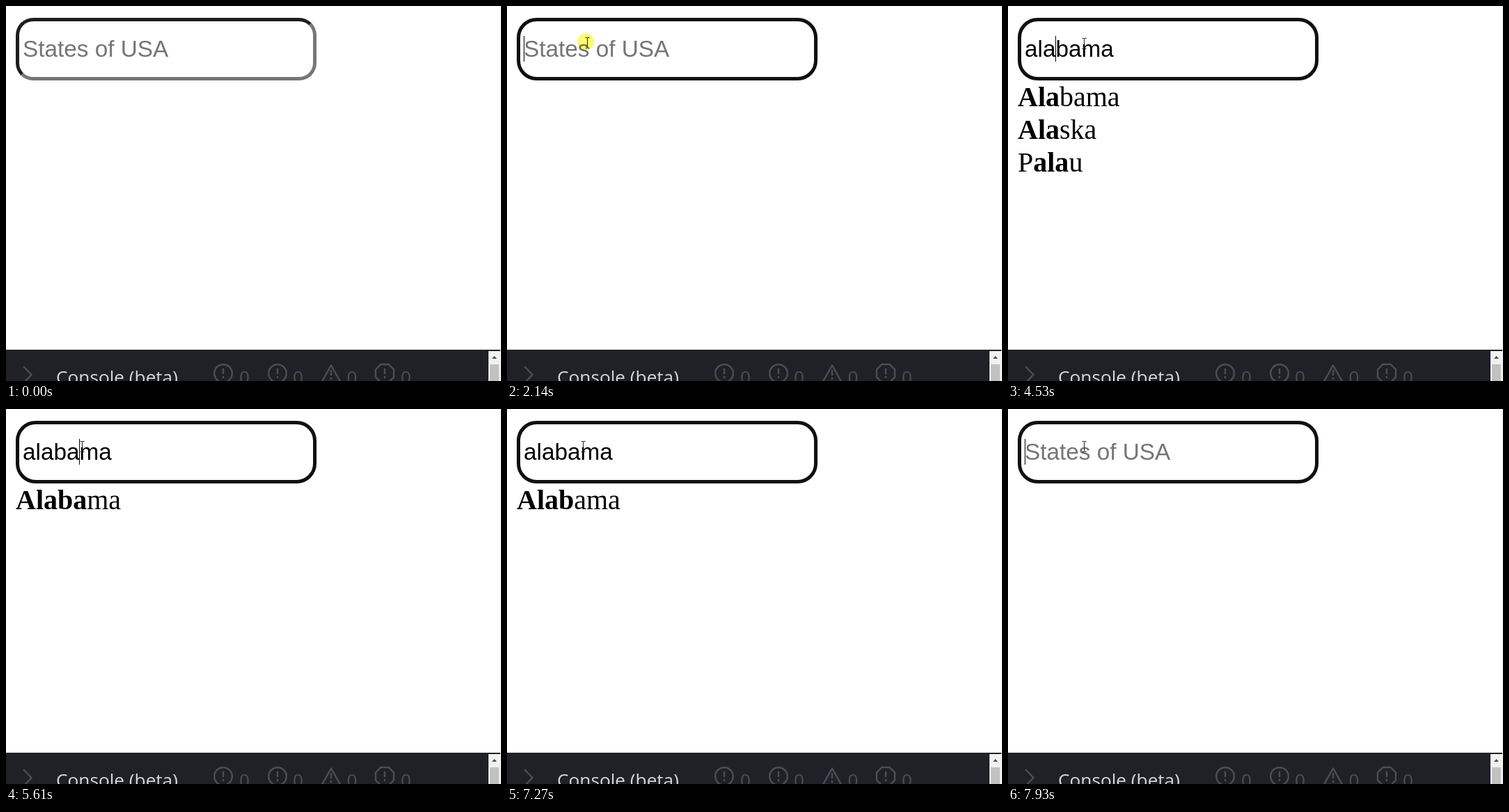
Write an HTML page that moves like this. It is 711 px wide and 539 px high and loops after 8 s.

```html
<!DOCTYPE html>
<html lang="en">
<head>
<meta charset="utf-8">
<title>Autocomplete field</title>
<style>
  html, body { margin: 0; width: 100%; height: 100%; overflow: hidden; background: #fff; }
  svg { position: absolute; left: 0; top: 0; }
  #field {
    position: absolute; left: 14px; top: 17px; width: 432px; height: 90px;
    box-sizing: border-box; border: 5px solid; border-radius: 25px;
    border-color: #1d1d1d #767676 #767676 #1d1d1d;
  }
  #value { font: 33.333px "Liberation Sans", Arial, sans-serif; }
  #results { font: 40px "Liberation Serif", "Times New Roman", serif; }
  .bold { font-weight: bold; }
  .console { font: 26.2px "Open Sans", "Noto Sans", sans-serif; }
  .icons { fill: none; stroke: #4b4e53; stroke-width: 2.4; }
  .icons text { fill: #4b4e53; stroke: none; }
  #glow { mix-blend-mode: multiply; }
</style>
</head>
<body>
<div id="field"></div>
<svg width="711" height="539" viewBox="0 0 711 539">
  <rect id="ring" x="16.5" y="19.5" width="427" height="85" rx="26" fill="none" stroke="#101010" stroke-width="5"/>
  <text id="value" x="24" y="73"></text>
  <rect id="caret" y="43" width="1" height="37"/>
  <g id="results"></g>

  <path d="M710.5 0V539" stroke="#ececec"/>
  <rect y="494" width="710" height="45" fill="#1f2127"/>
  <rect y="494" width="710" height="2" fill="#1b241f"/>
  <rect x="693" y="496" width="17" height="43" fill="#f1f1f1"/>
  <rect x="695" y="515" width="13" height="24" fill="#c1c1c1"/>
  <path d="M698 507l3.5-4 3.5 4z" fill="#505050"/>
  <text class="console" x="72" y="542.5" fill="#d6d7d9">Console (beta)</text>
  <g class="icons console">
    <path d="M25 518l11.500 12-11.500 12"/>
    <circle cx="312" cy="528" r="12.800"/>
    <circle cx="390" cy="528" r="12.800"/>
    <path d="M467 516.500l13.300 23.500h-26.600z" stroke-linejoin="round"/>
    <path d="M538.500 515h11l7.500 7.500v11l-7.500 7.500h-11l-7.500-7.500v-11z"/>
    <path d="M312 521v8m0 3v3M390 521v8m0 3v3M467 523v8m0 3v3M544 521v8m0 3v3"/>
    <text x="335" y="542.5">0</text>
    <text x="412" y="542.5">0</text>
    <text x="489.500" y="542.5">0</text>
    <text x="567" y="542.5">0</text>
  </g>

  <circle id="glow" cx="113" cy="51.500" r="12" fill="#fbfa72"/>
  <path id="beam" d="M-3-7.500h2.500l.5.500.500-.500h2.500M0-7V7M-3 7.500h2.500l.5-.500.500.500h2.500" fill="none" stroke="#222"/>
  <path id="arrow" d="M.5.500v16l3.700-3.500 2.500 5.500 2.300-1-2.500-5.500h5z" fill="#fff" stroke="#000"/>
</svg>
<script>
const LOOP = 8000, WORD = 'alabama';
const STATES = ['Alabama', 'Alaska', 'American Samoa', 'California', 'Palau'];

// [time, number of letters typed]
const KEYS = [[0, 0], [2740, 1], [2940, 2], [3470, 3], [5480, 4], [5610, 5], [6340, 6], [6470, 7],
  [7070, 6], [7200, 5], [7270, 4], [7470, 3], [7600, 2], [7800, 1], [7930, 0]];

// [time, x, y]
const MOVES = [[460, 631, 526], [530, 574, 428], [600, 432, 268], [670, 250, 140], [740, 122, 76],
  [800, 70.5, 44], [870, 97, 29], [1010, 107, 42], [1070, 115.5, 53], [2400, 112.5, 53], [2470, 109.5, 54]];

const CARET_OFF = [[0, 2140], [2670, 2740], [4000, 4530], [5060, 5480], [7000, 7470]];

const $ = id => document.getElementById(id);
const show = (id, on) => $(id).setAttribute('visibility', on ? 'visible' : 'hidden');
const latest = (steps, t) => steps.filter(s => s[0] <= t).pop();
const within = (t, [from, to]) => t >= from && t < to;

const ruler = document.createElement('canvas').getContext('2d');
ruler.font = '33.333px "Liberation Sans", Arial, sans-serif';

function renderText(count) {
  const typed = WORD.slice(0, count);
  $('value').textContent = count ? WORD : 'States of USA';
  $('value').setAttribute('fill', count ? '#000' : '#757575');
  $('caret').setAttribute('x', 24 + Math.floor(ruler.measureText(typed).width));
  const hits = count ? STATES.filter(s => s.toLowerCase().includes(typed)).slice(0, 3) : [];
  $('results').innerHTML = hits.map((s, i) =>
    `<text x="14" y="${144 + 47 * i}">${s.replace(new RegExp(typed, 'gi'), '<tspan class="bold">$&</tspan>')}</text>`
  ).join('');
}

function renderPointer(move) {
  const [, x, y] = move || [0, -50, -50];
  const overField = within(x, [14, 446]) && within(y, [17, 107]);
  show('beam', move && overField);
  show('arrow', move && !overField);
  for (const id of ['beam', 'arrow']) $(id).setAttribute('transform', `translate(${x} ${y})`);
}

let shown = -1;
function frame(now) {
  const t = now % LOOP;
  const count = latest(KEYS, t)[1];
  if (count !== shown) renderText(shown = count);
  renderPointer(latest(MOVES, t));
  const focused = t >= 2140;
  show('ring', focused);
  $('field').style.visibility = focused ? 'hidden' : 'visible';
  show('glow', within(t, [2140, 2200]));
  show('caret', !CARET_OFF.some(span => within(t, span)));
}

const start = performance.now();
function tick() {
  frame(performance.now() - start);
  requestAnimationFrame(tick);
}
tick();
</script>
</body>
</html>
```
